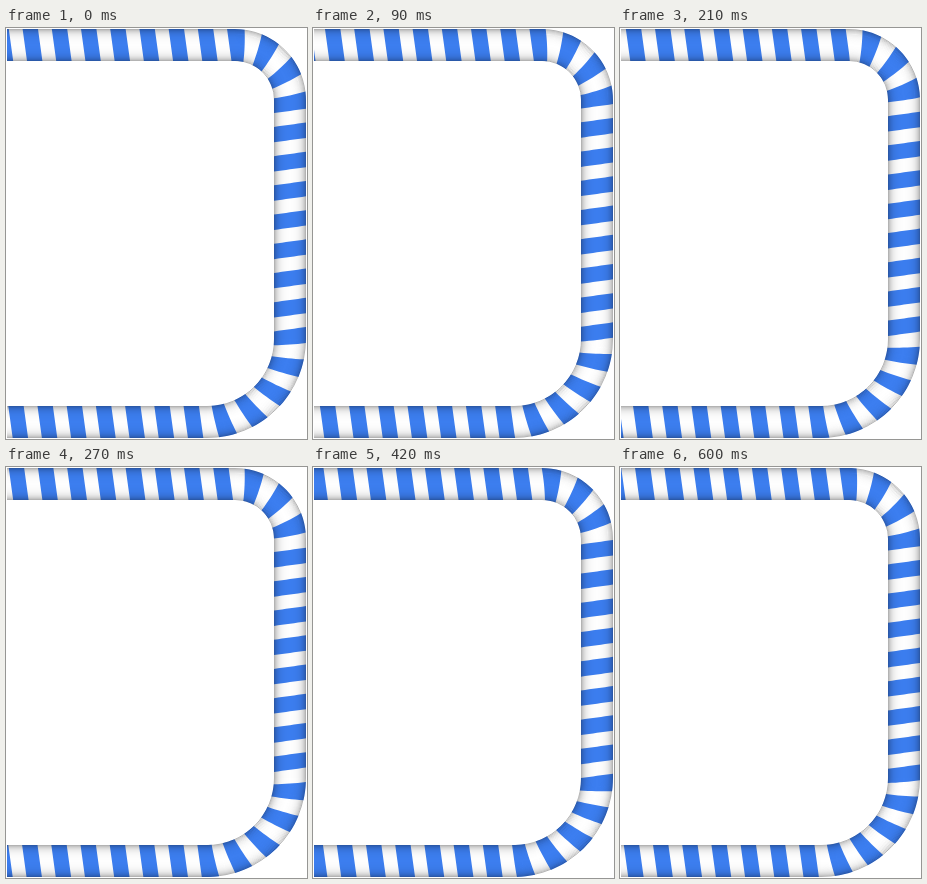
Recreate the animation shown at these times as an HTML page with a canvas. Size 301 by 411 pixels, loop 630 ms.

```html
<!DOCTYPE html>
<html>
<head>
<meta charset="utf-8">
<style>
html, body { margin: 0; width: 100%; height: 100%; overflow: hidden; background: #fff; }
canvas { display: block; }
</style>
</head>
<body>
<canvas id="stage" width="301" height="411"></canvas>
<script>
const ctx = document.getElementById('stage').getContext('2d');
const HALF = 16, PERIOD = 29.21, BLUE = 15.4, SKEW = 4.4 / 32;
// The stripes advance one period in 19 steps; the loop restarts after 21
const STEP = 30, STEPS = 21, SPEED = PERIOD / 19;
const left = 1, right = 284, top_ = 17, bottom = 394;
const r1 = 55, r2 = 83;
const quarter = Math.PI / 2;

// Lengths of the centre line: top, corner, side, corner, bottom
const lengths = [right - r1, r1 * quarter, bottom - top_ - r1 - r2, r2 * quarter, right - r2];
const total = lengths.reduce((a, b) => a + b);

// Point at distance s along the centre line, d towards the inside
function point(s, d) {
  let part = 0;
  while (part < 4 && s > lengths[part]) s -= lengths[part++];
  if (part === 0) return [s, top_ + d];
  if (part === 2) return [right - d, top_ + r1 + s];
  if (part === 4) return [right - r2 - s, bottom - d];
  const r = part === 1 ? r1 : r2;
  const a = s / r - (part === 1 ? quarter : 0);
  const cy = part === 1 ? top_ + r1 : bottom - r2;
  return [right - r + (r - d) * Math.cos(a), cy + (r - d) * Math.sin(a)];
}

function tube(d) {
  const p = new Path2D();
  p.moveTo(left, top_ + d);
  p.lineTo(right - r1, top_ + d);
  p.arc(right - r1, top_ + r1, r1 - d, -quarter, 0);
  p.arc(right - r2, bottom - r2, r2 - d, 0, quarter);
  p.lineTo(left, bottom - d);
  return p;
}

function stripe(start) {
  ctx.beginPath();
  for (let d = -HALF; d <= HALF; d += 4) ctx.lineTo(...point(start + d * SKEW, d));
  // Follow the curve along both long edges
  for (let s = 0; s <= BLUE; s += BLUE / 4) ctx.lineTo(...point(start + s + HALF * SKEW, HALF));
  for (let d = HALF; d >= -HALF; d -= 4) ctx.lineTo(...point(start + BLUE + d * SKEW, d));
  for (let s = BLUE; s >= 0; s -= BLUE / 4) ctx.lineTo(...point(start + s - HALF * SKEW, -HALF));
  ctx.fill();
}

function shade() {
  ctx.lineWidth = 1;
  for (let d = -HALF + 0.5; d < HALF; d++) {
    const edge = HALF - Math.abs(d);
    ctx.strokeStyle = `rgba(0,0,0,${0.34 * Math.exp(-edge / 3.8)})`;
    ctx.stroke(tube(d));
  }
}

function draw(now) {
  const shift = Math.floor(now / STEP) % STEPS * SPEED;
  ctx.fillStyle = '#fff';
  ctx.fillRect(0, 0, 301, 411);
  ctx.save();
  ctx.beginPath();
  ctx.rect(left, 0, 301, 411);
  ctx.clip();
  ctx.fillStyle = '#3c7ef0';
  for (let s = 18.8 - 2 * PERIOD - shift; s < total + 2 * PERIOD; s += PERIOD) stripe(s);
  shade();
  ctx.restore();
}

const begin = performance.now();
function tick() {
  draw(performance.now() - begin);
  requestAnimationFrame(tick);
}
tick();
</script>
</body>
</html>
```
